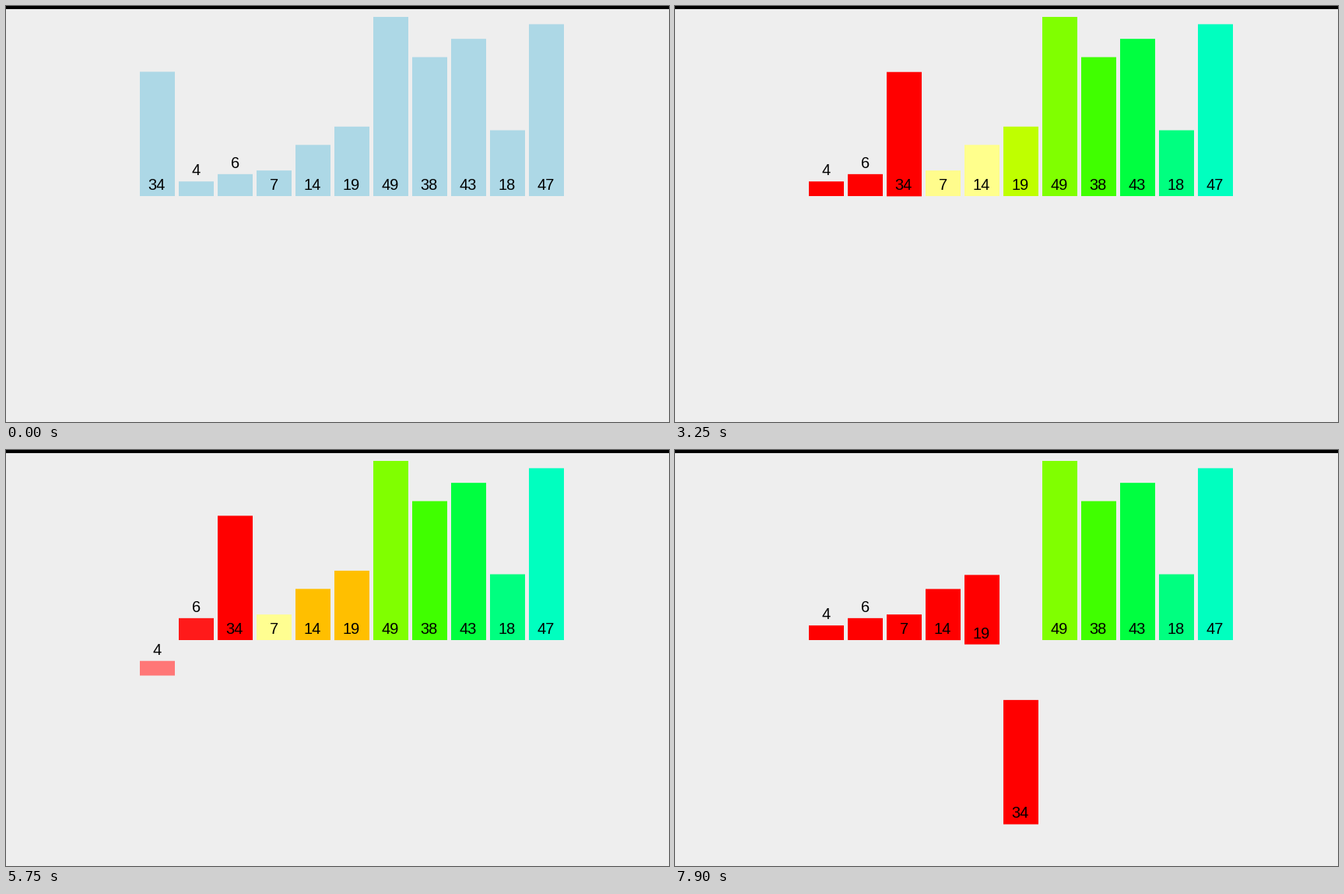
Animation of 852 by 534 pixels, one loop 8000 ms. Source, as a matplotlib script:

```python
from colorsys import hsv_to_rgb

import numpy as np
import matplotlib.pyplot as plt
from matplotlib.animation import FuncAnimation
from matplotlib.colors import to_rgb
from matplotlib.patches import Rectangle

plt.rcParams.update({"font.family": "Liberation Sans",
                     "text.hinting": "force_autohint", "toolbar": "None"})

W, H, DPI = 852, 534, 64
STEP_MS, FRAMES = 50, 160

VALUES = [34, 4, 6, 7, 14, 19, 49, 38, 43, 18, 47]
LEFT, PITCH, BAR_W = 172, 50, 45
TOP_ROW, LOW_ROW = 244, 504
UNIT = 230 / max(VALUES)
FONT_PX, DIGIT_W = 20, 0.556 * 20

# A new sorting step begins before the last tween has quite settled.
FIRST, PERIOD, TWEEN = 203, 200, 244

# The bars refresh slower than the stage, at a slightly drifting rate.
TICK_KEYS = [0, 21, 30, 48, 59, 75, 86]
TICK_MS = [475, 2203, 3190, 4754, 5689, 6953, 7872]
REFRESH = np.interp(np.arange(TICK_KEYS[-1] + 1), TICK_KEYS, TICK_MS)


def rainbow(i):
    """Hues 15 degrees apart, leaving out pure green."""
    return hsv_to_rgb((i + (i > 7)) / 24, 1, 1)


def ease(t):
    t = min(max(t, 0), 1)
    return 4 * t**3 if t < 0.5 else 1 - 4 * (1 - t)**3


def sort_steps():
    """Target poses per merge sort step; each row is x, base y, r, g, b."""
    n = len(VALUES)
    pose = np.zeros((n, 5))
    pose[:, 0] = LEFT + PITCH * np.arange(n)
    pose[:, 1] = TOP_ROW
    pose[:, 2:] = to_rgb("lightblue")
    order = list(range(n))
    steps = [pose.copy()]

    def snap():
        steps.append(pose.copy())

    def lighten(bar):
        pose[bar, 2:] = np.minimum(pose[bar, 2:] + 148 / 255, 1)

    def merge(lo, mid, hi):
        left, right = order[lo:mid], order[mid:hi]
        color = pose[left[0], 2:].copy()
        lighten(left[0])
        lighten(right[0])
        snap()
        merged = []
        while left or right:
            take_left = not right or (left and VALUES[left[0]] <= VALUES[right[0]])
            side = left if take_left else right
            bar = side.pop(0)
            pose[bar, :2] = LEFT + PITCH * (lo + len(merged)), LOW_ROW
            pose[bar, 2:] = color
            merged.append(bar)
            if side:
                lighten(side[0])
            snap()
        for bar in merged:
            pose[bar, 1] = TOP_ROW
            snap()
        order[lo:hi] = merged

    def sort(lo, hi):
        if hi - lo > 1:
            mid = (lo + hi + 1) // 2
            sort(lo, mid)
            sort(mid, hi)
            merge(lo, mid, hi)

    pose[:, 2:] = [rainbow(i) for i in range(n)]
    snap()
    sort(0, n)
    return steps


STEPS = sort_steps()
STARTS = [STEPS[0]]
for target in STEPS:
    STARTS.append(STARTS[-1] + (target - STARTS[-1]) * ease(PERIOD / TWEEN))


def pose_at(ms):
    tick = np.searchsorted(REFRESH, ms, side="right") - 1
    if tick < 0:
        return STEPS[0]
    step, since = divmod(REFRESH[tick] - FIRST, PERIOD)
    start, end = STARTS[int(step)], STEPS[int(step)]
    return start + (end - start) * ease(since / TWEEN)


fig = plt.figure(figsize=(W / DPI, H / DPI), dpi=DPI, facecolor="#eeeeee")
ax = fig.add_axes([0, 0, 1, 1])
ax.set(xlim=(0, W), ylim=(H, 0))
ax.axis("off")
ax.add_patch(Rectangle((0, 0), W, 4, fc="black", lw=0))

bars, labels = [], []
for value in VALUES:
    bars.append(ax.add_patch(Rectangle((0, 0), BAR_W, value * UNIT, lw=0, snap=False)))
    labels.append(ax.text(0, 0, str(value), size=FONT_PX * 72 / DPI, color="black",
                          ha="left", va="baseline", zorder=3))


def draw(frame):
    for bar, label, (x, base, *rgb) in zip(bars, labels, pose_at(frame * STEP_MS)):
        height = bar.get_height()
        bar.set_xy((x, base - height))
        bar.set_facecolor(np.clip(rgb, 0, 1))
        # Short bars carry their label on top.
        text_y = base - 8 - (height if height < 30 else 0)
        text_x = x + (BAR_W - DIGIT_W * len(label.get_text())) / 2
        # Just under half a pixel back, so side bearings round down.
        label.set_position((round(text_x) - 0.45, round(text_y)))
    return bars + labels


anim = FuncAnimation(fig, draw, frames=FRAMES, interval=STEP_MS, repeat=True,
                     repeat_delay=0, blit=False)
plt.show()
```
